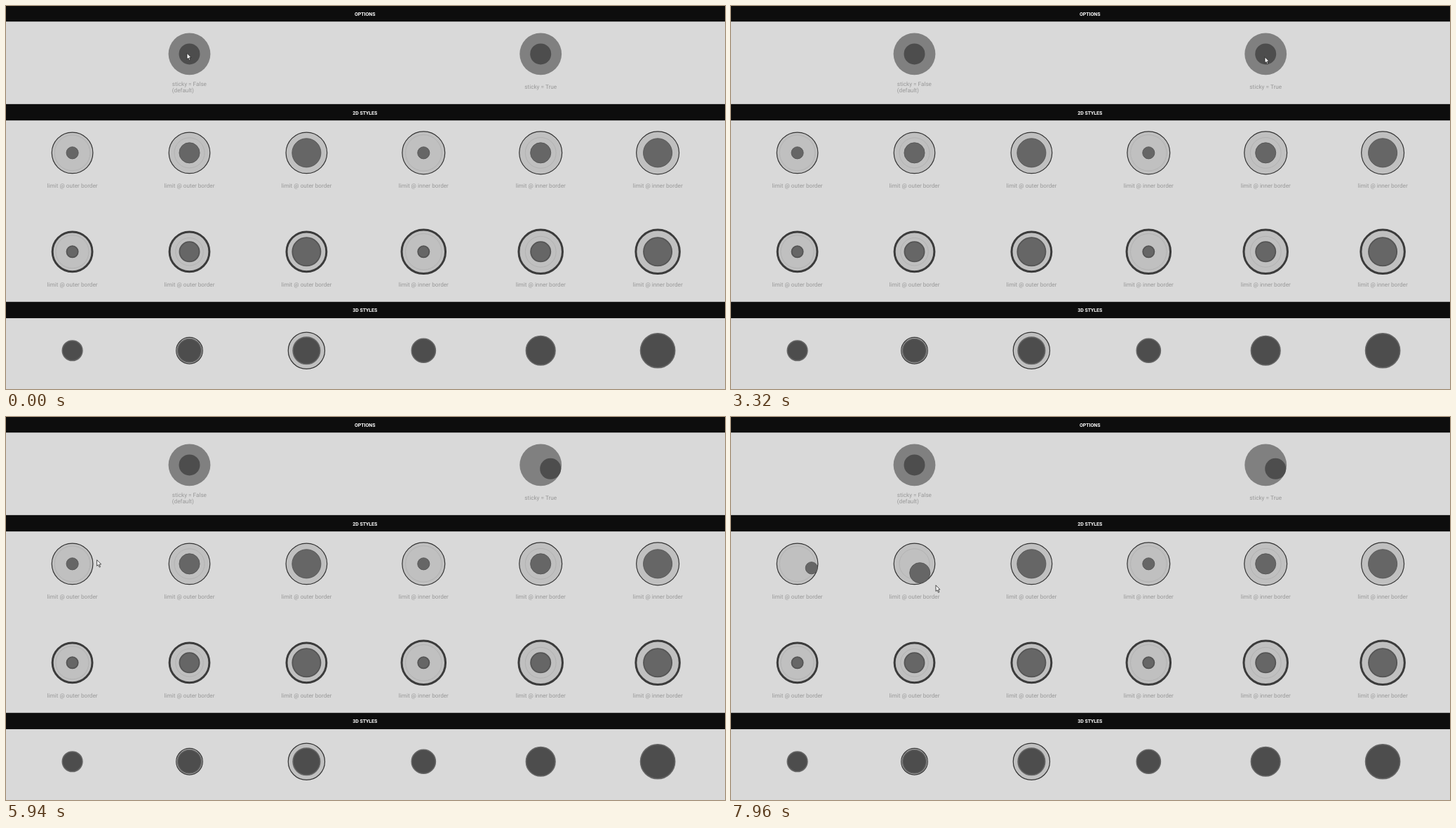
These frames come from a looping animation (1025x546 px, 7.99 s). An HTML page with a canvas:

```html
<!DOCTYPE html>
<html lang="en">
<head>
<meta charset="utf-8">
<title>Joystick styles</title>
<style>
  html, body { margin: 0; width: 100%; height: 100%; overflow: hidden; background: #d9d9d9; }
  canvas { display: block; }
</style>
</head>
<body>
<canvas id="stage" width="1025" height="546"></canvas>
<script>
const ctx = document.getElementById('stage').getContext('2d');
const LOOP = 7990, REST = [0, 0];
const colX = col => 94.6 + 166.9 * col;
const rowY = row => 68.4 + 140.95 * row;

// Pointer moves: start ms, end ms, goal x, goal y, bow (how far the path sags)
const home = [258, 67];
const moves = [
  [200, 940, 292, 86.5],
  [1070, 1850, 236, 80, 5],
  [1880, 2100, 234, 77],
  [2120, 2610, 629, 65],
  [2710, 3380, 764, 72.5],
  [3520, 3620, 769, 71],
  [3620, 4080, 750, 73.5],
  [4260, 4670, 794, 80.7, 1.5],
  [5040, 5820, 197, 211, 50],
  [5850, 6000, 94.5, 206.7, -5],
  [6150, 6640, 79, 208],
  [6660, 7030, 95, 212],
  [7030, 7480, 191, 235, 4.5],
  [7480, 7720, 272, 206.3],
  [7720, 7960, 292, 239.5]
];

function pointer(t) {
  let [x, y] = home;
  for (const [from, to, goalX, goalY, bow = 0] of moves) {
    if (t < from) break;
    const u = Math.min(1, (t - from) / (to - from));
    const ease = u * u * (3 - 2 * u);
    x += (goalX - x) * ease;
    y += (goalY - y) * ease + bow * Math.sin(Math.PI * u);
  }
  return [x, y];
}

// Offset of a dragged stick, limited to a circle
function drag(t, press, release, limit, sticky) {
  if (t < press || (t > release && !sticky)) return REST;
  const from = pointer(press), to = pointer(Math.min(t, release));
  const dx = to[0] - from[0], dy = to[1] - from[1];
  const k = Math.min(1, limit / (Math.hypot(dx, dy) || 1));
  return [dx * k, dy * k];
}

function disc(x, y, r, fill, line, width = 0) {
  ctx.beginPath();
  ctx.arc(x, y, r - width / 2, 0, 7);
  if (fill) { ctx.fillStyle = fill; ctx.fill(); }
  if (line) { ctx.strokeStyle = line; ctx.lineWidth = width; ctx.stroke(); }
}

function label(text, x, y, align = 'center', color = '#999', font = '8.2px') {
  ctx.font = font + ' Roboto, sans-serif';
  ctx.textAlign = align;
  ctx.fillStyle = color;
  ctx.fillText(text, x, y);
}

function header(text, row) {
  const y = rowY(row) - 69.5;
  ctx.fillStyle = '#0d0d0d';
  ctx.fillRect(0, y, 1025, 23.3);
  label(text, 511.7, y + 14.7, 'center', '#fff', 'bold 6.95px');
}

function option(col, [dx, dy]) {
  const x = colX(col), y = rowY(0);
  disc(x, y, 29.9, '#808080');
  disc(x + dx, y + dy, 15, '#4d4d4d');
}

function flat(row, col, [dx, dy]) {
  const x = colX(col), y = rowY(row);
  const inner = col > 2, thick = row > 1, step = col % 3;
  const border = thick ? 3 : 1.2;
  const r = inner ? 29.9 + border * 0.95 : 29.9;
  const guide = (inner ? 26.2 : 27 - border) - step * 3.8;
  disc(x, y, r, '#c0c0c0', thick ? '#3b3b3b' : '#333', border);
  disc(x, y, guide, null, '#b2b2b2', 0.9);
  disc(x + dx, y + dy, 9 + 6 * step, '#666', '#555', thick ? 1.8 : 0.9);
  label(`limit @ ${inner ? 'inner' : 'outer'} border`, x, y + 50);
}

function solid(col) {
  const x = colX(col), y = rowY(3);
  if (col === 1 || col === 2) disc(x, y, 12.1 + 7.3 * col, '#c0c0c0', '#333', 1.2);
  disc(x, y, col < 3 ? 15.1 + 2.5 * col : 6.6 + 3.75 * col, '#4d4d4d', '#666', 1.5);
}

const arrowShape = new Path2D('M0 0V8.6L2 6.9 3.5 10.4 4.9 9.8 3.4 6.4 6 6.2Z');

function arrow([x, y]) {
  ctx.save();
  ctx.translate(x, y + 0.3);
  ctx.fillStyle = '#fff';
  ctx.strokeStyle = '#222';
  ctx.lineWidth = 0.8;
  ctx.fill(arrowShape);
  ctx.stroke(arrowShape);
  ctx.restore();
}

function draw(t) {
  ctx.textRendering = 'geometricPrecision';
  ctx.fillStyle = '#d9d9d9';
  ctx.fillRect(0, 0, 1025, 546);
  header('OPTIONS', 0);
  header('2D STYLES', 1);
  header('3D STYLES', 3);

  option(1, drag(t, 330, 2110, 15, false));
  option(4, drag(t, 3620, 4900, 15, true));
  label('sticky = False', 236.8, 113.6, 'left');
  label('(default)', 236.8, 123.2, 'left');
  label('sticky = True', colX(4), 118.3);

  const moved = [drag(t, 6000, 7480, 21, true), drag(t, 7720, LOOP, 15, true)];
  for (let col = 0; col < 6; col++) {
    flat(1, col, moved[col] || REST);
    flat(2, col, REST);
    solid(col);
  }
  arrow(pointer(t));
}

const start = performance.now();
function tick() {
  draw((performance.now() - start) % LOOP);
  requestAnimationFrame(tick);
}
tick();
</script>
</body>
</html>
```
